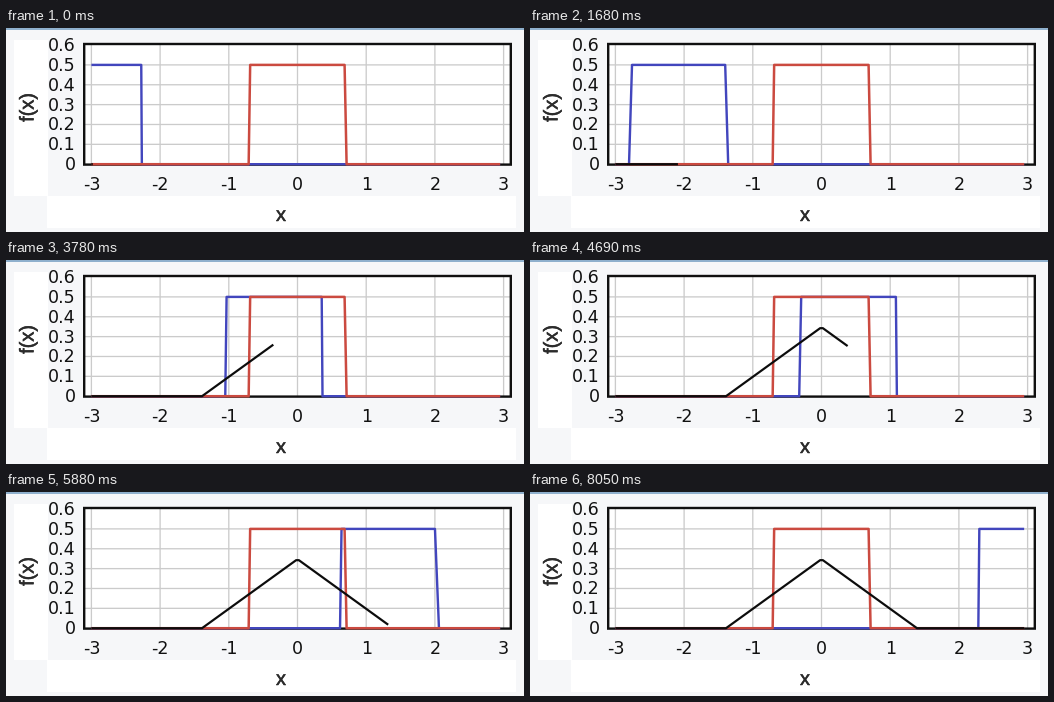
A matplotlib script that plays this animation: 518x204 px, repeating every 8.4 s.

```python
import numpy as np
import matplotlib.pyplot as plt
from matplotlib.animation import FuncAnimation
from matplotlib.patches import Rectangle
from matplotlib.patheffects import withStroke

W, H, DPI = 518, 204, 100
FRAMES, STEP_MS, LAST = 120, 70, 115

BLUE, RED, BLACK = "#4246bd", "#cb4a40", "#0c0c0c"
GRID, INK, TITLE = "#cbcbcb", "#111111", "#2b2b2b"
X0, UNIT = 291.5, 68.7        # pixel of x = 0, pixels per unit
Y0, RISE = 136.2, 198.6       # pixel of f = 0, pixels per unit
START, END = -3.0, 2.95
HALF = 0.7

# Progress of the sweep: frame, pulse centre, lean of left and right edge (px)
KEYS = np.array([
    (0, -2.97, 1, 0.6),
    (9, -2.95, 1, 0.6),
    (24, -2.08, 3, 3),
    (40, -1.13, 0.6, 0.6),
    (67, 0.39, 2, 1),
    (84, 1.33, 1.5, 4),
    (100, 2.21, 2.4, 3),
    (115, 2.99, 1, 1),
])


def px(x):
    return X0 + UNIT * np.asarray(x, float)


def py(y):
    return Y0 - RISE * np.asarray(y, float)


def pt(pixels):
    return pixels * 72 / DPI


def box_pulse(center, lean_left, lean_right):
    """Rectangular pulse in data units, clipped to the drawn range."""
    a, b = lean_left / UNIT / 2, lean_right / UNIT / 2
    left, right = center - HALF, center + HALF
    xs = [left - a, left + a, right - b, right + b]
    ys = [0, 0.5, 0.5, 0]
    inside = [(x, y) for x, y in zip(xs, ys) if START < x < END]
    first = np.interp(START, xs, ys)
    last = np.interp(END, xs, ys)
    return np.array([(START, first), *inside, (END, last)]).T


def overlap(end):
    """Triangle traced by the overlap of both pulses up to `end`."""
    base = 2 * HALF - 0.01
    knots = [-base, -0.02, 0.02, base]
    xs = np.array([START] + [k for k in knots if k < end] + [end])
    return xs, np.maximum(0, 0.25 * (base - np.maximum(np.abs(xs), 0.02)))


fig = plt.figure(figsize=(W / DPI, H / DPI), dpi=DPI, facecolor="#f6f7f9")
ax = fig.add_axes([0, 0, 1, 1])
ax.set_xlim(0, W)
ax.set_ylim(H, 0)
ax.axis("off")


def panel(x, y, w, h, color="white"):
    ax.add_patch(Rectangle((x, y), w, h, fc=color, lw=0))


def line(xs, ys, color, width, **kw):
    return ax.plot(xs, ys, color=color, lw=pt(width), snap=False,
                   solid_joinstyle="round", solid_capstyle="butt", **kw)[0]


def label(x, y, s, **kw):
    kw = {"ha": "center", "va": "baseline", "family": "DejaVu Sans",
          "size": pt(17.5), "color": INK, **kw}
    return ax.text(x, y, s, **kw)


def axis_title(x, y, s, **kw):
    text = label(x, y, s, family="Liberation Sans", size=pt(20), color=TITLE, **kw)
    text.set_path_effects([withStroke(linewidth=pt(0.5), foreground=TITLE)])


panel(0, 0, W, 2, "#8fb0cd")
panel(8, 12, 34, 156)
panel(41, 168, 469, 32)
panel(78, 16, 427, 121)

for k in range(-3, 4):
    line([px(k)] * 2, [16, 136], GRID, 1.3, zorder=1.2)
    label(px(k), 162.5, str(k))
for k in range(7):
    y = py(k / 10)
    if 0 < k < 6:
        line([78, 504], [y, y], GRID, 1.3, zorder=1.2)
    label(69.5, y + 6, f"{k / 10:g}", ha="right")

ax.add_patch(Rectangle((78.2, 16), 426.6, 120.6, fill=False, ec="#101010",
                       lw=pt(2.4), snap=False, zorder=1.5))
axis_title(275, 193, "x")
axis_title(22, 79.5, "f(x)", rotation=90, va="center")

moving = line([], [], BLUE, 2.4)
fixed = line([], [], RED, 2.5)
result = line([], [], BLACK, 2.2)
x, y = box_pulse(0, 1.5, 2)
fixed.set_data(px(x), py(y))


def draw(frame):
    f = min(frame, LAST)
    center, lean_l, lean_r = (np.interp(f, KEYS[:, 0], KEYS[:, i])
                              for i in (1, 2, 3))
    x, y = box_pulse(center, lean_l, lean_r)
    moving.set_data(px(x), py(y))
    x, y = overlap(min(center - 0.01, END))
    result.set_data(px(x), py(y))
    return moving, result


anim = FuncAnimation(fig, draw, frames=FRAMES, interval=STEP_MS,
                     repeat=True, repeat_delay=0, blit=False)
plt.show()
```
